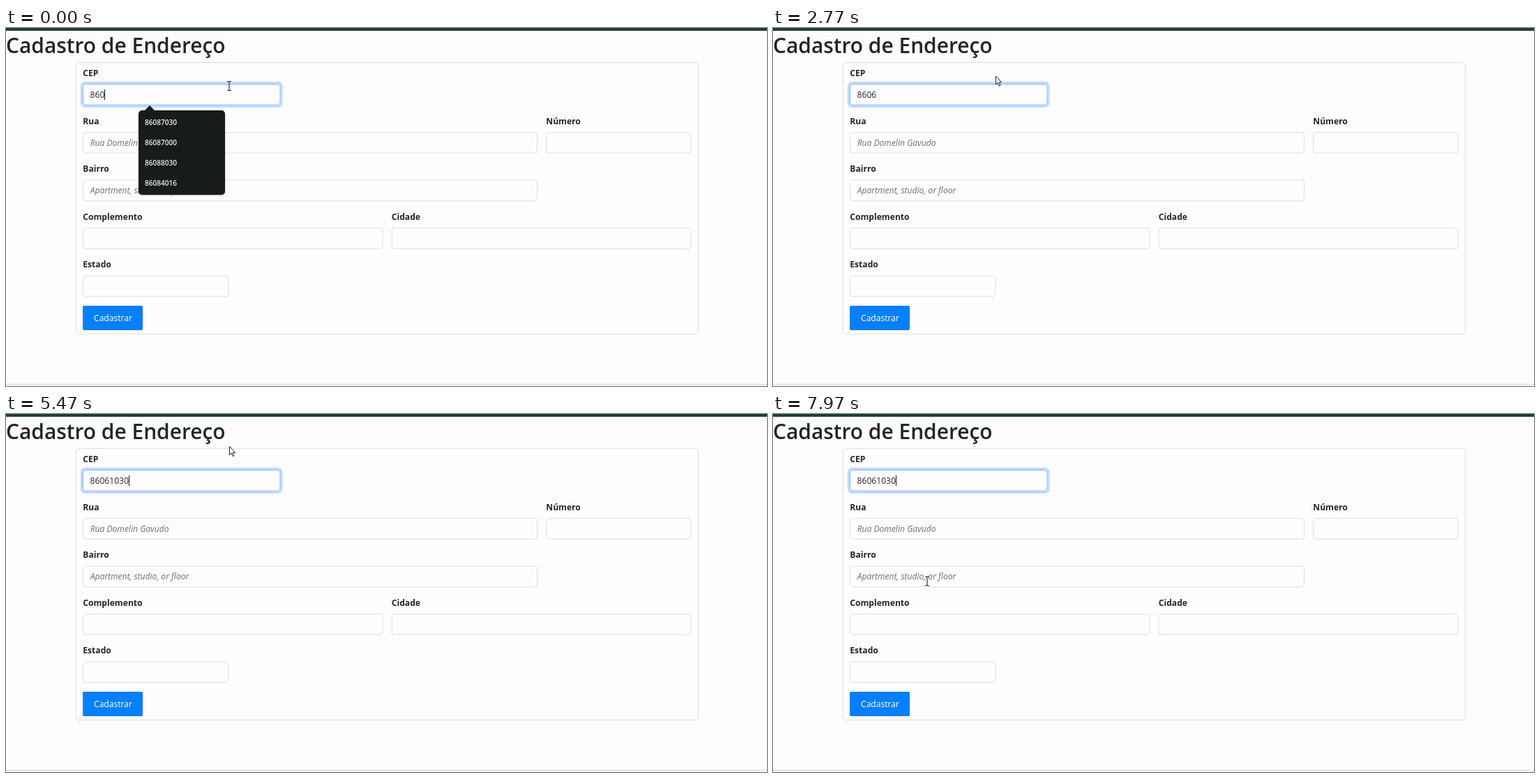
An HTML page that plays this animation: 1091 by 513 pixels, repeating every 8 s.

```html
<!DOCTYPE html>
<html lang="pt-BR">
<head>
<meta charset="utf-8">
<title>Cadastro de Endereço</title>
<style>
  html, body { margin: 0; width: 100%; height: 100%; overflow: hidden; background: #fdfdfd; }
  svg { display: block; font: 12.1px "Open Sans", "Noto Sans", sans-serif; fill: #212529; }
  text { white-space: pre; }
  .title { font-size: 29.9px; font-weight: 600; }
  .label { font-weight: 700; }
  .hint { font-style: italic; fill: #6c7072; }
  .box { fill: none; stroke: #dddfe0; }
  .option { font-size: 10.05px; font-weight: 600; fill: #eef2f1; }
</style>
</head>
<body>
<svg width="1091" height="513" viewBox="0 0 1091 513">
  <rect width="1091" height="4" fill="#213f39"/>
  <path d="M0 510.5H1091" stroke="#cfcbf0"/>
  <text class="title" x="0" y="36">Cadastro de Endereço</text>
  <rect class="box" x="100.5" y="49.5" width="892" height="389" rx="4.5"/>
  <g id="form"></g>
  <rect x="110" y="398" width="86" height="35" rx="2" fill="#067ffb"/>
  <text x="126" y="420" style="fill:#fff">Cadastrar</text>
  <text id="cep" x="120.6" y="100"></text>
  <path id="caret" d="M.5 88V103" stroke="#111"/>
  <g id="popup">
    <rect x="189.5" y="119" width="125" height="121.5" rx="5.5" fill="#000" opacity=".18"/>
    <path d="M198 119L206 111L214 119Z" fill="#151c1a"/>
    <rect x="190" y="118" width="124" height="121" rx="5" fill="#151c1a"/>
  </g>
  <g id="mouse">
    <path id="arrow" d="M.5 .5V12.6L3.2 10L5.2 14.6L7 13.8L5 9.4H8.6Z" fill="#fff" stroke="#222"/>
    <path id="beam" d="M-3 -6.5H-1L0 -5.8L1 -6.5H3M0 -6V6M-3 6.5H-1L0 5.8L1 6.5H3" fill="none" stroke="#222" stroke-width="1.1"/>
  </g>
</svg>
<script>
const LOOP = 8000, BLINK = 530;
const $ = id => document.getElementById(id);

// label, x, y, width, placeholder
const fields = [
  ["CEP", 110.5, 80.5, 282.5, ""],
  ["Rua", 110.5, 149.5, 651, "Rua Domelin Gavudo"],
  ["Número", 774.5, 149.5, 207.5, ""],
  ["Bairro", 110.5, 218, 651, "Apartment, studio, or floor"],
  ["Complemento", 110.5, 286.5, 429.5, ""],
  ["Cidade", 553, 286.5, 429, ""],
  ["Estado", 110.5, 355, 208.5, ""],
];
const HEIGHT = 29.7;

$("form").innerHTML = fields.map(([label, x, y, w, hint], i) => `
  <text class="label" x="${x - .2}" y="${y - 11.7}">${label}</text>
  ${i ? "" : `<rect x="${x - 2}" y="${y - 2}" width="${w + 4}" height="${HEIGHT + 4}" rx="5" fill="none" stroke="#c2daff" stroke-width="3.4"/>`}
  <rect class="box" x="${x}" y="${y}" width="${w}" height="${HEIGHT}" rx="4" ${i ? "" : 'style="stroke:#86b7fe"'}/>
  <text class="hint" x="${x + 10.2}" y="${y + 19}">${hint}</text>`).join("");

$("popup").innerHTML += ["86087030", "86087000", "86088030", "86084016"]
  .map((s, i) => `<text class="option" x="199" y="${138.8 + i * 28.9}">${s}</text>`).join("");

// each key press restarts the caret blink
const keys = [[-180, "860"], [1140, "8606"], [3700, "86061"], [4200, "860610"],
              [4950, "8606103"], [5365, "86061030"]];

// time, x, y of the pointer
const path = [[0, 320, 83], [300, 320, 83], [600, 319, 78], [1300, 319, 78], [1600, 319, 77],
              [2200, 319, 77], [2700, 319, 68.5], [3500, 319, 68.5], [4200, 320, 46],
              [7150, 320, 46], [7900, 221, 239.5], [LOOP, 221, 239.5]];

function pointer(t) {
  const i = path.findIndex(p => p[0] > t);
  const [t0, x0, y0] = path[i - 1], [t1, x1, y1] = path[i];
  const u = (t - t0) / (t1 - t0), e = u * u * (3 - 2 * u);
  return [x0 + (x1 - x0) * e, y0 + (y1 - y0) * e];
}

const show = (id, on) => $(id).setAttribute("visibility", on ? "visible" : "hidden");

function draw(t) {
  const [pressed, value] = keys.filter(k => k[0] <= t).pop();
  $("cep").textContent = value;
  const end = Math.round(120.6 + $("cep").getComputedTextLength());
  $("caret").setAttribute("transform", `translate(${end})`);
  show("caret", (t - pressed) % (2 * BLINK) < BLINK);
  show("popup", value.length < 4);

  const [x, y] = pointer(t);
  const overField = fields.some(([, fx, fy, w]) => x > fx && x < fx + w && y > fy && y < fy + HEIGHT);
  $("mouse").setAttribute("transform", `translate(${x} ${y})`);
  show("arrow", !overField);
  show("beam", overField);
}

const start = performance.now();
function tick() {
  draw((performance.now() - start) % LOOP);
  requestAnimationFrame(tick);
}
tick();
</script>
</body>
</html>
```
